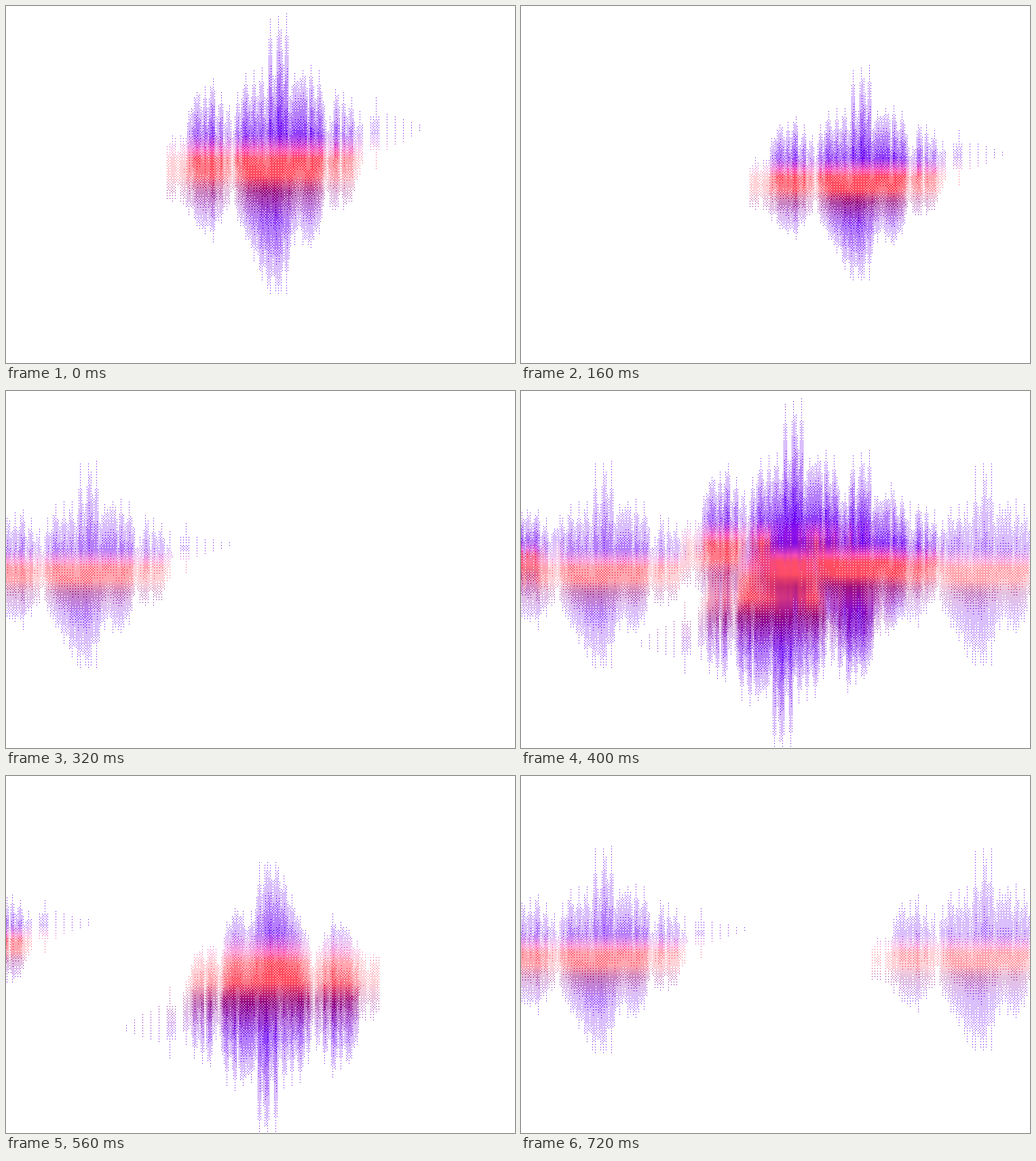
An HTML page with a canvas that plays this animation: 750x526 px, repeating every 0.88 s.

```html
<!DOCTYPE html>
<html lang="en">
<head>
<meta charset="utf-8">
<title>Dotted sound wave</title>
<style>
  html, body { margin: 0; width: 100%; height: 100%; overflow: hidden; background: #fff; }
  canvas { display: block; }
</style>
</head>
<body>
<canvas id="stage" width="750" height="526"></canvas>
<script>
const W = 750, H = 526, STEP = 80, LOOP = 880, PITCH = 4, AXIS = 228;
const ctx = document.getElementById('stage').getContext('2d');

// Outline of the wave: x, top, bottom
const outline = [
  [237, 186, 288], [257, 190, 290], [277, 126, 322], [305, 107, 348], [331, 147, 290],
  [353, 98, 346], [377, 90, 405], [389, 18, 424], [413, 11, 424], [421, 98, 352],
  [457, 83, 357], [469, 118, 302], [505, 126, 303], [525, 160, 235]];
const gaps = [253, 333, 473, 493];

// Colour by height: y, [r, g, b]
const violet = [108, 0, 248], red = [255, 78, 96];
const stops = [
  [188, violet], [212, [250, 80, 185]], [225, red], [250, red], [274, [150, 10, 130]], [318, violet]];

const clamp = v => Math.max(0, Math.min(1, v));
const mix = (a, b, t) => a + (b - a) * t;

let seed = 7;
const random = () => (seed = seed * 16807 % 2147483647) / 2147483647;

// Interpolates between rows that start with their key.
function lookup(rows, key, blend) {
  const i = rows.findIndex(row => row[0] > key);
  if (i === 0) return rows[0];
  if (i < 0) return rows[rows.length - 1];
  const a = rows[i - 1], b = rows[i];
  return blend(a, b, (key - a[0]) / (b[0] - a[0]));
}
const outlineAt = x => lookup(outline, x, (a, b, t) => a.map((v, i) => mix(v, b[i], t)));
const hueAt = y => lookup(stops, y, (a, b, t) => [y, a[1].map((v, i) => mix(v, b[1][i], t))])[1];

const bars = [];
function addBar(x, top, bottom, level) {
  bars[(x - 1) / PITCH] = { top, bottom, level };
}

// Every third bar reaches the outline; the others stay shorter.
for (let x = 237; x <= 525; x += PITCH) {
  const [, top, bottom] = outlineAt(x);
  const spike = x % 12 === 5, gap = gaps.includes(x);
  const up = spike ? 1 : mix(.55, .95, random()), down = spike ? 1 : mix(.75, 1, random());
  const a = mix(AXIS, top, gap ? .4 : up), b = mix(AXIS, bottom, gap ? .6 : down);
  addBar(x, a, b, clamp((b - a - 60) / 160) * mix(.8, 1, random()));
}
// Thin tail
for (let i = -2; i <= 1; i++) addBar(545 + i * PITCH, i ? 160 : 134, i ? 213 : 240, .12);
for (let i = 0; i < 5; i++) addBar(561 + i * 12, 158 + i * 4, 213 - i * 7, .04);

function barAlpha(bar, y) {
  if (!bar || y < bar.top || y > bar.bottom) return 0;
  const u = Math.min(y - bar.top, bar.bottom - y) / (bar.bottom - bar.top) * 2;
  return Math.min(.93, .04 + 1.1 * bar.level * u);
}

const wave = new Float32Array(W * H);
for (let y = 0; y < H; y++) {
  for (let x = 1; x < W; x++) {
    const i = Math.floor((x - 1) / PITCH), t = (x - 1) % PITCH / PITCH;
    wave[y * W + x] = mix(barAlpha(bars[i], y), barAlpha(bars[i + 1], y), t);
  }
}

// A layer maps stage coordinates back to the wave.
function shifted(dx, scale, dy, alpha, hue) {
  const srcY = y => (y - dy) / scale;
  return { x: x => x - dx, y: srcY, hue: hue || srcY, alpha };
}
const main = shifted(0, 1, 0, 1);
const turned = { x: x => 786 - x, y: y => 550 - y, hue: y => (y - 258) / 1.2 + 212, alpha: 1 };
const right = shifted(100, .7675, 78.6, 1);
const left = shifted(-280, .75, 91, .64);
const faint = shifted(280, .75, 91, .45);
const edge = shifted(-488, .745, 81, 1, y => (y - 240) * 1.6 + 222);

const scenes = [
  [main], [turned], [right], [edge], [left],
  [main, turned, right, left, faint, edge],
  [main, faint], [turned, edge], [right], [left, faint]];

const bayer = [[0, 8, 2, 10], [12, 4, 14, 6], [3, 11, 1, 9], [15, 7, 13, 5]];

function render(layers) {
  const image = ctx.createImageData(W, H), px = image.data.fill(255);
  for (let y = 0; y < H; y++) {
    const rows = layers.map(l => ({ l, sy: Math.round(l.y(y)), hue: hueAt(l.hue(y)) }))
      .filter(row => row.sy >= 0 && row.sy < H);
    for (let x = 0; x < W; x++) {
      let alpha = 0, r = 0, g = 0, b = 0;
      for (const { l, sy, hue } of rows) {
        const sx = l.x(x);
        if (sx < 0 || sx >= W) continue;
        const a = wave[sy * W + sx] * l.alpha;
        alpha = mix(alpha, 1, a);
        r = mix(r, hue[0], a);
        g = mix(g, hue[1], a);
        b = mix(b, hue[2], a);
      }
      const threshold = (bayer[(y + 1) & 3][(x + 3) & 3] + .5) / 16;
      if (alpha > threshold) px.set([r / alpha, g / alpha, b / alpha], (y * W + x) * 4);
    }
  }
  return image;
}

const images = scenes.map(render);
let shown = -1;
function draw() {
  const n = Math.min(scenes.length - 1, Math.floor(performance.now() % LOOP / STEP));
  if (n !== shown) ctx.putImageData(images[shown = n], 0, 0);
  requestAnimationFrame(draw);
}
draw();
</script>
</body>
</html>
```
